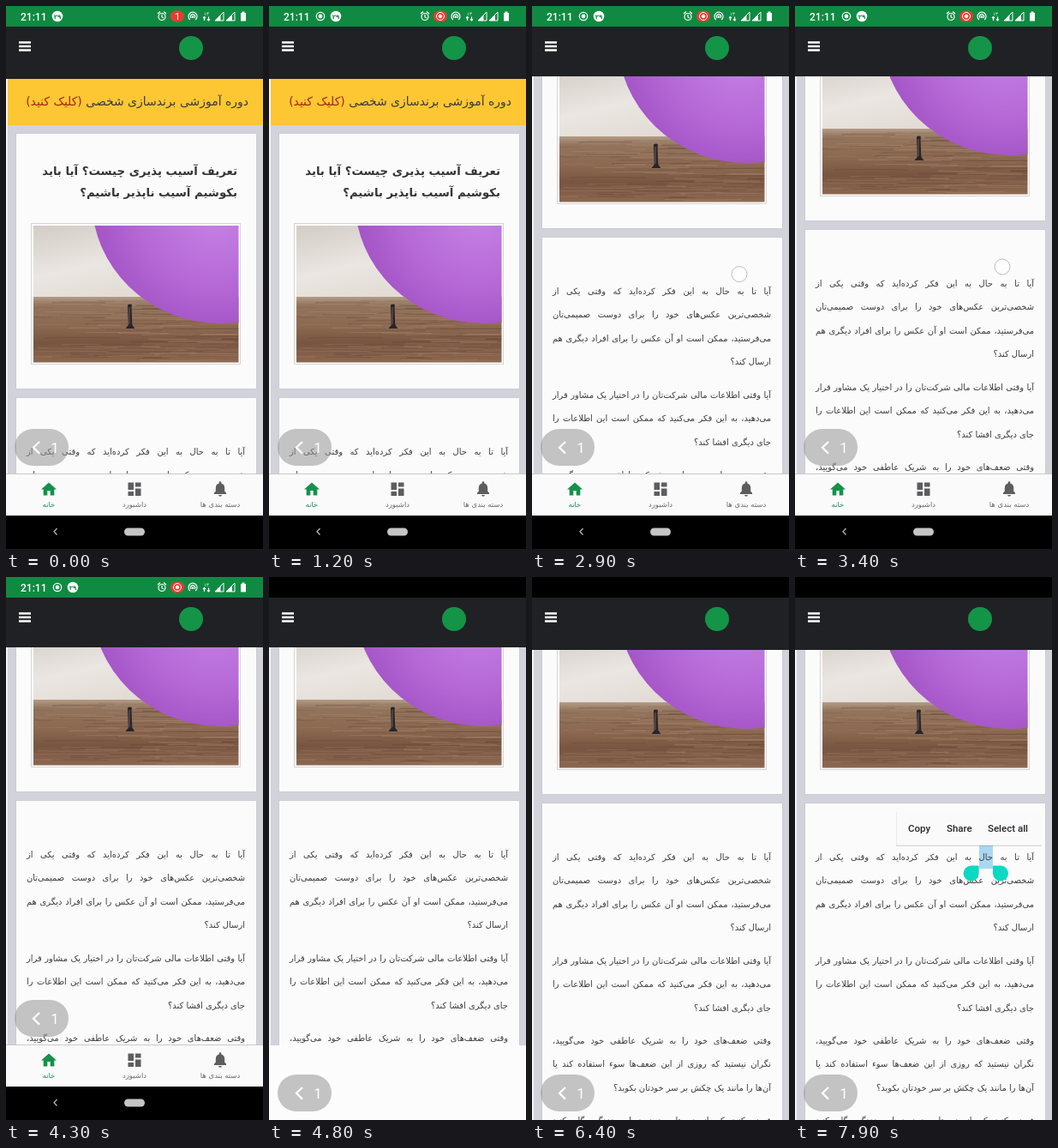
An HTML page that plays this animation: 300 px wide and 633 px high, repeating every 8 s.

```html
<!DOCTYPE html>
<html lang="fa">
<head>
<meta charset="utf-8">
<title>Article on a phone</title>
<style>
html, body { margin: 0; width: 100%; height: 100%; overflow: hidden; background: #000; }
#stage { position: relative; width: 300px; height: 633px; overflow: hidden; background: #d2d2db; font-family: "DejaVu Sans", sans-serif; }
#page, #page > *, #header, #overlay { position: absolute; }
#page { left: 0; top: 0; width: 300px; height: 900px; }
#edge { left: 0; top: 0; width: 2px; height: 900px; background: #f4f4f5; }
#banner { left: 2px; top: 84px; width: 298px; height: 55px; background: #fdc733; }
.card { left: 12px; width: 280px; background: #fbfbfb; box-shadow: 0 0 1px #aaa; }
.line { direction: rtl; text-align: right; height: 28px; line-height: 28px; color: #3b3b3d; }
.wide { text-align: justify; text-align-last: justify; }
.title { font-weight: bold; color: #343436; }
#word { padding: 8px 0; }
#header { left: 0; top: 24px; width: 300px; background: #202124; }
#overlay { left: 0; top: 0; }
#overlay, #photo { display: block; }
</style>
</head>
<body>
<div id="stage">
  <div id="page">
    <div id="edge"></div>
    <div id="banner"></div>
    <div class="card" style="top:149px;height:297px"></div>
    <div class="card" style="top:457px;height:440px"></div>
    <svg id="photo" style="left:29px;top:253px" width="245" height="165" viewBox="29 253 245 165">
      <defs>
        <linearGradient id="wall" x1="0" y1="0" x2=".6" y2="1">
          <stop offset="0" stop-color="#d3ccc5"/><stop offset=".5" stop-color="#eae6e2"/><stop offset="1" stop-color="#e0d8d0"/>
        </linearGradient>
        <linearGradient id="wood" x1="0" y1="0" x2="0" y2="1">
          <stop offset="0" stop-color="#b39c86"/><stop offset=".13" stop-color="#92745d"/>
          <stop offset=".45" stop-color="#8b6850"/><stop offset=".7" stop-color="#785541"/><stop offset="1" stop-color="#8c6851"/>
        </linearGradient>
        <radialGradient id="balloon" cx=".48" cy=".56" r=".53">
          <stop offset="0" stop-color="#c683e4"/><stop offset=".55" stop-color="#b568d6"/>
          <stop offset=".88" stop-color="#a555c6"/><stop offset="1" stop-color="#8e45ac"/>
        </radialGradient>
        <clipPath id="frame"><rect x="32" y="256" width="239.5" height="159.5"/></clipPath>
      </defs>
      <rect x="29.5" y="253.5" width="244" height="164" fill="#fff" stroke="#d4d4d4"/>
      <g clip-path="url(#frame)">
        <rect x="32" y="256" width="240" height="90" fill="url(#wall)"/>
        <rect x="32" y="339" width="240" height="77" fill="url(#wood)"/>
        <g id="grain"></g>
        <ellipse cx="250" cy="225" rx="150" ry="145" fill="url(#balloon)"/>
        <path d="M142 348.5q3-2 5 0l-.5 3 .8 20 3 4.500h-11l3.500-4z" fill="#29242a"/>
        <path d="M144 351v20M140 376.5h9" stroke="#81716b" stroke-width=".8"/>
      </g>
    </svg>
  </div>
  <div id="header"></div>
  <svg id="overlay" width="300" height="633" viewBox="0 0 300 633">
    <path d="M15 42.5h14M15 47h14M15 51.5h14" stroke="#fff" stroke-width="2.6"/>
    <circle cx="216" cy="49" r="14" fill="#149447"/>
    <rect width="300" height="24" id="statusBack"/>
    <g id="status" fill="#fff">
      <text x="17" y="16.5" font-family="Roboto, sans-serif" font-size="12" font-weight="500">21:11</text>
      <g id="recording" fill="none" stroke="#fff" stroke-width="1.2">
        <circle cx="60" cy="12" r="4.7"/><circle cx="60" cy="12" r="1.8" fill="#fff"/>
      </g>
      <g id="date"><circle cy="12" r="6.3"/><text y="14.7" text-anchor="middle" font-size="7" font-weight="bold" fill="#148743">۲۹</text></g>
      <g fill="none" stroke="#fff" stroke-width="1.2">
        <circle cx="182" cy="12.5" r="4"/><path d="M182 10v3l2 1M177 9l3-2.5M187 9l-3-2.5"/>
        <path d="M214.8 16a5 5 0 1 1 6.4 0M216.2 14a2.5 2.5 0 1 1 3.6 0"/>
        <path d="M231.5 17v-4.5m-1.5 1.5 1.5-1.5 1.5 1.5M236.5 12.5v4.5m-1.5-1.5 1.5 1.5 1.5-1.5"/>
      </g>
      <circle cx="218" cy="12.8" r="1.2"/>
      <text x="234" y="10.5" font-size="5.5" text-anchor="middle">۱۳</text>
      <path d="M244 17 254 7v10zM257 17 267 7v10z" fill="none" stroke="#fff"/>
      <path d="M244 17l6.5-6.5V17zM257 17l7-7v7z"/>
      <path d="M274 8h1.5V6.5h3V8h1.5v9.5h-6z"/>
      <rect x="192" y="5.5" width="16" height="13" rx="6.5" fill="#e93c32"/>
      <text id="count" x="200" y="16" text-anchor="middle" font-family="Roboto, sans-serif" font-size="11">1</text>
      <g id="live" fill="none" stroke="#fff"><circle cx="200" cy="12" r="4.5"/><circle cx="200" cy="12" r="1.8" fill="#fff"/></g>
    </g>
    <rect id="blank" y="546" width="300" height="87" fill="#fcfcfc"/>
    <g id="nav">
      <rect y="545" width="300" height="49" fill="#fafafa"/>
      <path d="M0 545.5h300" stroke="#c9c9cc"/>
      <path d="M41 563.5l9-8 9 8h-2.7v7h-4.6V565h-3.4v5.5h-4.6v-7z" fill="#14914a"/>
      <path d="M142.5 555.5h6.5v8.5h-6.5zM151 555.5h6.5v5H151zM142.5 566h6.5v5h-6.5zM151 562.5h6.5v8.5H151z" fill="#5d5d5f"/>
      <path d="M243 569v-1.5l1.8-1.8V562q0-4.6 3.9-5.5v-1q0-1.2 1.3-1.2t1.3 1.2v1q3.9.9 3.9 5.5v3.7l1.8 1.8v1.5zM248 570h4q-.3 1.8-2 1.8t-2-1.8z" fill="#5d5d5f"/>
      <g font-size="8.5" text-anchor="middle" fill="#69696b">
        <text x="50" y="584" fill="#14914a">خانه</text><text x="150" y="584">داشبورد</text><text x="250" y="584">دسته بندی ها</text>
      </g>
      <rect y="594" width="300" height="39"/>
      <path d="M59.5 609l-3.5 3.8 3.5 3.7" fill="none" stroke="#b5b5b5" stroke-width="1.3"/>
      <rect x="138" y="608.5" width="24" height="9" rx="4.5" fill="#c5c5c5"/>
    </g>
    <g id="badge">
      <rect x="10" width="63" height="43" rx="21.5" fill="#969696" fill-opacity=".55"/>
      <path d="M39 15l-7 6.8 7 6.8" fill="none" stroke="#fff" stroke-width="2.2"/>
      <text x="57" y="28" font-family="Roboto, sans-serif" font-size="17" text-anchor="middle" fill="#fff">1</text>
    </g>
    <circle id="touch" cx="242" r="9" fill="#fff" fill-opacity=".7" stroke="#bdbdbd"/>
    <g id="selection">
      <path id="leftGrip" d="M0 0v9a9 9 0 1 1-9-9z" fill="#0bd9c2"/>
      <path id="rightGrip" d="M0 0v9a9 9 0 1 0 9-9z" fill="#0bd9c2"/>
      <rect x="118" y="274" width="170" height="40" fill="#000" opacity=".13"/>
      <rect x="118.5" y="273" width="169.5" height="39.5" fill="#fafafa"/>
      <g font-family="Roboto, sans-serif" font-size="11.5" font-weight="500" fill="#27272a">
        <text x="132" y="297">Copy</text><text x="177" y="297">Share</text><text x="225" y="297">Select all</text>
      </g>
    </g>
  </svg>
</div>
<script>
const $ = id => document.getElementById(id);
const pen = document.createElement('canvas').getContext('2d');
const plain = html => html.replace(/<[^>]+>/g, '');
// "~" stands for the non-joiner between parts of a word
const unjoin = text => text.replaceAll('~', String.fromCharCode(0x200c));

// Type size at which the longest line fills its column
function sizeFor(lines, width, weight = 'normal') {
  pen.font = `${weight} 100px "DejaVu Sans", sans-serif`;
  return 100 * (width - 2) / Math.max(...lines.map(line => pen.measureText(plain(line)).width));
}

function addLine(html, left, width, middle, size, kind = '') {
  const el = document.createElement('div');
  el.className = 'line ' + kind;
  el.style.cssText = `left:${left}px;width:${width}px;top:${middle - 14}px;font-size:${size}px`;
  el.innerHTML = html;
  $('page').append(el);
}

const banner = 'دوره آموزشی برندسازی شخصی <span style="color:#a6260d">(کلیک کنید)</span>';
addLine(banner, 21, 262, 111, sizeFor([banner], 262));

const title = ['تعریف آسیب پذیری چیست؟ آیا باید', 'بکوشیم آسیب ناپذیر باشیم؟'];
const titleSize = sizeFor(title, 230, 'bold');
title.forEach((line, i) => addLine(line, 40, 230, 193 + i * 25, titleSize, 'title'));

const paragraphs = [
  ['آیا تا به <span id="word">حال</span> به این فکر کرده~اید که وقتی یکی از',
   'شخصی~ترین عکس~های خود را برای دوست صمیمی~تان',
   'می~فرستید، ممکن است او آن عکس را برای افراد دیگری هم',
   'ارسال کند؟'],
  ['آیا وقتی اطلاعات مالی شرکت~تان را در اختیار یک مشاور قرار',
   'می~دهید، به این فکر می~کنید که ممکن است این اطلاعات را',
   'جای دیگری افشا کند؟'],
  ['وقتی ضعف~های خود را به شریک عاطفی خود می~گویید،',
   'نگران نیستید که روزی از این ضعف~ها سوء استفاده کند یا',
   'آن~ها را مانند یک چکش بر سر خودتان بکوبد؟'],
  ['فرض کنید که از دوستان خود درباره زندگی گله کنید', '']
].map(lines => lines.map(unjoin));
const bodySize = sizeFor(paragraphs.flat(), 255);
let middle = 520;
for (const lines of paragraphs) {
  lines.forEach((line, i) => {
    addLine(line, 24, 255, middle, bodySize, i < lines.length - 1 ? 'wide' : '');
    middle += 27.4;
  });
  middle += 11.1;
}

// Wood grain
let seed = 7;
const random = () => (seed = seed * 16807 % 2147483647) / 2147483647;
let grain = '';
for (let i = 0; i < 110; i++) {
  const x = 20 + random() * 220, y = 342 + random() * 73, length = 20 + random() * 90;
  grain += `<path d="M${x} ${y}q${length / 2} ${random() * 3 - 1.5} ${length} 0" fill="none" stroke="${random() < .55 ? '#4f3427' : '#c09b7e'}" stroke-width="${.4 + random()}" opacity=".28"/>`;
}
$('grain').innerHTML = grain;

const DURATION = 8000, STEP = 100, TRAVEL = 196;
const show = (id, on) => { $(id).style.display = on ? '' : 'none'; };
const ease = p => p < .5 ? 4 * p ** 3 : 1 - (2 - 2 * p) ** 3 / 2;

function draw(t) {
  const scroll = TRAVEL * ease(Math.min(1, Math.max(0, (t - 2200) / 900)));
  const counting = t < 500, fullScreen = t >= 4700, resized = t >= 5000, selected = t >= 7200;

  $('page').style.transform = `translateY(${(resized ? 3 : 0) - Math.round(scroll)}px)`;
  $('header').style.height = (scroll > 0 && !resized ? 58 : 61) + 'px';
  $('statusBack').setAttribute('fill', fullScreen ? '#000' : '#108a42');
  show('status', !fullScreen);
  show('recording', !counting);
  show('live', !counting);
  show('count', counting);
  $('date').setAttribute('transform', `translate(${counting ? 60 : 78} 0)`);

  show('nav', !fullScreen);
  show('blank', fullScreen && !resized);
  $('badge').setAttribute('transform', `translate(0 ${fullScreen ? 580 : 493})`);

  show('touch', t >= 2500 && t < 3500);
  $('touch').setAttribute('cy', 500 - scroll);

  show('selection', selected);
  $('word').style.background = selected ? '#a9d8f1' : 'none';
  if (selected) {
    const box = $('word').getBoundingClientRect();
    $('leftGrip').setAttribute('transform', `translate(${box.left} 336.5)`);
    $('rightGrip').setAttribute('transform', `translate(${box.right} 336.5)`);
  }
}

const start = performance.now();
function tick() {
  const t = (performance.now() - start) % DURATION;
  draw(Math.floor(t / STEP) * STEP);
  requestAnimationFrame(tick);
}
tick();
</script>
</body>
</html>
```
